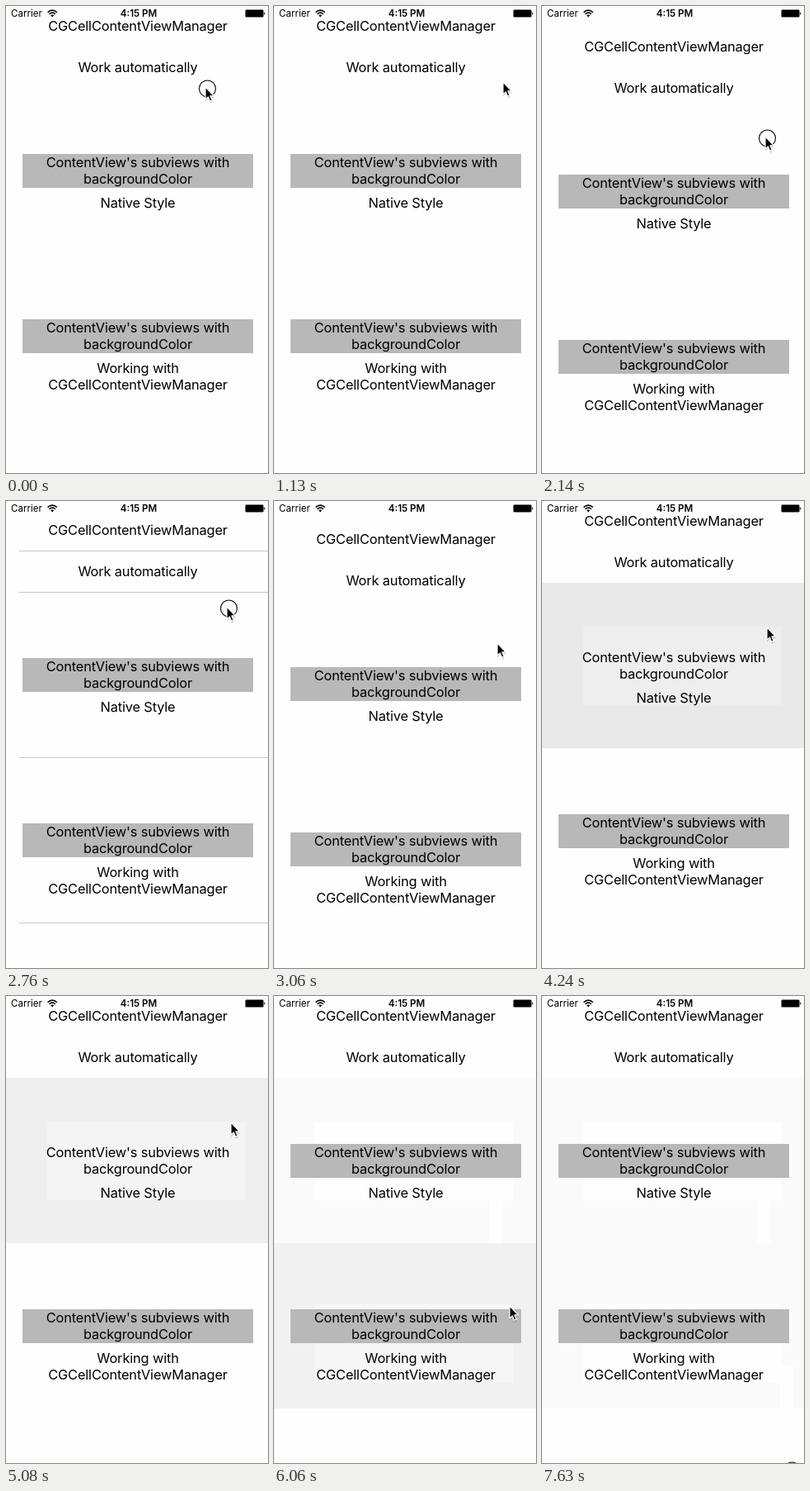
Recreate the animation shown at these times as an HTML page. Size 318 px wide and 565 px high, loop 7670 ms.

```html
<!DOCTYPE html>
<html lang="en">
<head>
<meta charset="utf-8">
<title>Table cell selection</title>
<style>
html, body { margin: 0; width: 100%; height: 100%; overflow: hidden; background: #fefefe; }
body { position: relative; color: #000; font: 16.4px/20px Inter, "Liberation Sans", sans-serif; letter-spacing: -.16px; }
div { position: absolute; }
#stage { left: 0; top: 0; width: 318px; height: 565px; overflow: hidden; }
#table { left: 0; top: 0; width: 318px; height: 565px; }
.cell { left: 0; width: 318px; height: 200px; }
.text { left: 0; width: 320px; text-align: center; white-space: pre; }
.label { left: 20px; top: 80px; width: 280px; height: 41px; background: #b8b8b8; }
.glow { left: 50px; width: 240px; height: 95px; }
.trail { bottom: 0; width: 16px; height: 52px; }
.line { left: 16px; width: 302px; height: 1px; background: #c9c9cb; }
svg { position: absolute; left: 0; top: 0; }
.status { top: 1px; font-size: 11.6px; line-height: 16px; letter-spacing: 0; white-space: pre; }
</style>
</head>
<body>
<div id="stage">
  <div id="table">
    <div class="text" style="top:14px">CGCellContentViewManager</div>
    <div class="text" style="top:64px">Work automatically</div>
    <div class="cell" style="top:99px">
      <div class="glow" style="top:53px"></div>
      <div class="trail" style="left:261px"></div>
      <div class="label"></div>
      <div class="text" style="top:80px">ContentView's subviews with
backgroundColor</div>
      <div class="text" style="top:129px">Native Style</div>
    </div>
    <div class="cell" style="top:299px">
      <div class="glow" style="top:74px"></div>
      <div class="trail" style="left:289px"></div>
      <div class="label"></div>
      <div class="text" style="top:80px">ContentView's subviews with
backgroundColor</div>
      <div class="text" style="top:129px">Working with
CGCellContentViewManager</div>
    </div>
    <div id="lines">
      <div class="line" style="top:49px"></div>
      <div class="line" style="top:99px"></div>
      <div class="line" style="top:299px"></div>
      <div class="line" style="top:499px"></div>
    </div>
  </div>
  <div class="status" style="left:6px">Carrier</div>
  <div class="status" style="left:61px;width:200px;text-align:center;font-weight:600">4:15 PM</div>
  <svg width="318" height="565">
    <path d="M50.6 7.6Q56.2 2.6 61.8 7.6M52.6 9.8Q56.2 6.6 59.8 9.8" fill="none" stroke="#000" stroke-width="1.7"/>
    <path d="M54.2 11.3Q56.2 9.8 58.2 11.3L56.2 13.4Z"/>
    <rect x="290.5" y="4.6" width="22" height="9" rx="1.4"/>
    <path d="M313.2 7.6Q315.8 9.1 313.2 10.6Z"/>
    <g id="pointer">
      <circle id="ring" cx="2.5" cy="2" r="10" fill="none" stroke="#000" stroke-width="1.1"/>
      <path d="M0 2V17.5L3.6 14 6 19.6 8.6 18.5 6.2 13H11Z" opacity=".2"/>
      <path d="M0 0V15L3.4 11.9 5.6 17.2 8.1 16.1 5.9 10.9H10.4Z" stroke="#fff" stroke-width="1.2" stroke-linejoin="round"/>
    </g>
  </svg>
</div>
<script>
const LOOP = 7670, FADE = 500, PRESS = 150;
const GRAB = 1880, RELEASE = 2960, SETTLED = 3530;
const $ = id => document.getElementById(id);

// Pointer moves: [start, end, x, y]
const moves = [
  [200, 520, 258, 78], [520, 960, 278, 88], [990, 1130, 278, 92],
  [GRAB, 2140, 271, 158], [2190, 2320, 271, 191], [2320, 2620, 268, 114], [2620, 2760, 268, 128],
  [2820, RELEASE, 271, 174], [RELEASE, 3410, 273, 157], [3470, SETTLED, 273, 153],
  [5200, 5450, 262, 299], [5450, 5700, 286, 375], [6540, 7410, 301, 572]
];

const cells = [
  { taps: [4040, 4810], left: 5430, clears: true },
  { taps: [5750, 6540], left: 7000, clears: false }
];
document.querySelectorAll('.cell').forEach((el, i) => {
  const find = name => el.querySelector('.' + name);
  Object.assign(cells[i], { el, label: find('label'), glow: find('glow'), trail: find('trail') });
});

const between = (t, a, b) => t >= a && t < b;
const show = (el, on) => { el.style.visibility = on ? 'visible' : 'hidden'; };
const grey = v => `rgb(${v},${v},${v})`;

function pointerAt(t) {
  let x = 242, y = 98;
  for (const [start, end, toX, toY] of moves) {
    if (t <= start) break;
    const p = Math.min(1, (t - start) / (end - start));
    const k = p * p * (3 - 2 * p);
    x += (toX - x) * k;
    y += (toY - y) * k;
  }
  return [x, y];
}

// The table resists the drag, then springs back
const pull = t => Math.max(0, 0.45 * (pointerAt(t)[1] - 102.5));
function scrollAt(t) {
  if (!between(t, GRAB, SETTLED)) return 0;
  if (t < RELEASE) return pull(t);
  const s = (t - RELEASE) * 0.0115;
  return pull(RELEASE) * (1 + s) * Math.exp(-s);
}

function isPressed(t) {
  const tapped = cells.some(c => c.taps.some(tap => between(t, tap - PRESS, tap)));
  return tapped || t < 20 || between(t, GRAB, RELEASE) || t >= 7630;
}

function drawCell({ taps, left, clears, el, label, glow, trail }, t) {
  const tap = taps.filter(s => s <= t).pop();
  const age = t - tap;
  const shade = Math.round(Math.min(250, 219 + 36 * age / FADE));
  el.style.background = tap ? grey(shade) : 'none';
  glow.style.background = trail.style.background = grey(Math.min(254, shade + 5));
  show(glow, t >= taps[0] + 200);
  show(trail, t >= left);
  show(label, !(clears && age < FADE));
}

function draw(t) {
  // Half-point steps; hairlines only show between whole points
  const offset = Math.round(scrollAt(t) * 2) / 2;
  $('table').style.top = Math.floor(offset) + 'px';
  show($('lines'), offset % 1);
  cells.forEach(cell => drawCell(cell, t));
  $('pointer').setAttribute('transform', `translate(${pointerAt(t).map(Math.round)})`);
  show($('ring'), isPressed(t));
}

const start = performance.now();
function tick() {
  draw((performance.now() - start) % LOOP);
  requestAnimationFrame(tick);
}
tick();
</script>
</body>
</html>
```
